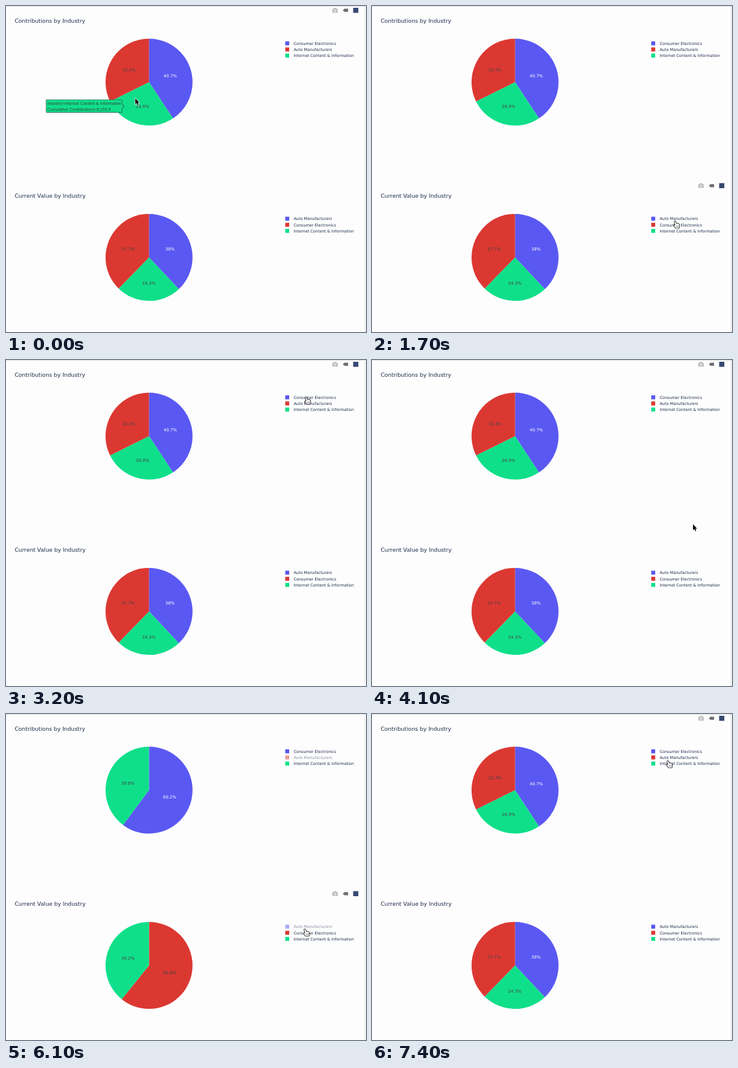
Write an HTML page with a canvas that moves like this. It is 600 px wide and 544 px high and loops after 7500 ms.

```html
<!DOCTYPE html>
<html lang="en">
<head>
<meta charset="utf-8">
<title>Industry pies</title>
<style>
html, body { margin: 0; width: 100%; height: 100%; overflow: hidden; background: #fdfdfe; }
canvas { display: block; }
</style>
</head>
<body>
<canvas id="stage" width="600" height="544"></canvas>
<script>
const ctx = document.getElementById('stage').getContext('2d');
const LOOP = 7500, STEP = 100, CX = 238.4, R = 72.5, TAU = Math.PI * 2;
const BLUE = '#5a58f2', RED = '#dc3832', GREEN = '#10df8a';
const SANS = '"DejaVu Sans", Verdana, sans-serif';
const ARIAL = '"Liberation Sans", Arial, sans-serif';

const slice = (name, value, color) => ({ name, value, color });
// `off` is the time span in which the Auto Manufacturers slice is switched off
const plots = [
  { top: 0, title: 'Contributions by Industry', field: 'Cumulative Contributions', off: [4400, 6700],
    data: [slice('Consumer Electronics', 13842.6, BLUE),
           slice('Auto Manufacturers', 10990.4, RED),
           slice('Internet Content & Information', 9153.9, GREEN)] },
  { top: 292.6, title: 'Current Value by Industry', field: 'Daily Balance', off: [5300, 6300],
    data: [slice('Auto Manufacturers', 22812.3, BLUE),
           slice('Consumer Electronics', 22619.7, RED),
           slice('Internet Content & Information', 14584.2, GREEN)] }
];

// Pointer path: time, x, y
const path = [
  [0, 215.5, 154], [100, 214, 160], [500, 222, 330], [700, 219, 458], [800, 219, 458],
  [1000, 200, 410], [1200, 272, 400], [1600, 505, 359], [2500, 505, 359],
  [2900, 502, 160], [3200, 500, 62], [3400, 510, 66], [4000, 537, 266], [4100, 535, 274],
  [4300, 498, 73], [4400, 498, 73], [4600, 570, 300], [4700, 570, 300], [5100, 498, 359],
  [6200, 498, 359], [6600, 499, 72], [6800, 499, 72], [7400, 493, 78]
];

function pointerAt(t) {
  const i = path.findIndex(p => p[0] > t);
  if (i < 0) return path[path.length - 1].slice(1);
  const [t0, x0, y0] = path[i - 1], [t1, x1, y1] = path[i];
  const k = (t - t0) / (t1 - t0);
  return [x0 + (x1 - x0) * k, y0 + (y1 - y0) * k];
}

function text(str, x, y, size, color, align = 'left', family = SANS) {
  ctx.font = `${size}px ${family}`;
  ctx.fillStyle = color;
  ctx.textAlign = align;
  ctx.fillText(str, x, y);
}

function rect(x, y, w, h, color) {
  ctx.fillStyle = color;
  ctx.fillRect(x, y, w, h);
}

function shape(d, x, y, fill, stroke, width = 1) {
  const p = new Path2D(d);
  ctx.save();
  ctx.translate(x, y);
  ctx.lineJoin = 'round';
  ctx.lineWidth = width;
  if (stroke) { ctx.strokeStyle = stroke; ctx.stroke(p); }
  ctx.fillStyle = fill;
  ctx.fill(p, 'evenodd');
  ctx.restore();
}

// The first slice runs clockwise from the top, the others counterclockwise.
function layout(plot, t) {
  const shown = plot.data.filter(s => !isOff(plot, s, t));
  const total = shown.reduce((sum, s) => sum + s.value, 0);
  let a = 0;
  return [shown[0], ...shown.slice(1).reverse()].map(s => {
    const part = s.value / total, start = a;
    a += part * TAU;
    const mid = (start + a) / 2;
    const inner = R / (1 + 1 / Math.sin(Math.PI * Math.min(part, 0.5)));
    return { ...s, part, start, end: a, mid, inner,
      x: CX + Math.sin(mid) * (R - inner),
      y: plot.top + 127 - Math.cos(mid) * (R - inner) };
  });
}

function isOff(plot, s, t) {
  return s.name.startsWith('Auto') && t >= plot.off[0] && t < plot.off[1];
}

function drawPlot(plot, slices, t) {
  const cy = plot.top + 127;
  text(plot.title, 14.4, plot.top + 27.5, 9.25, '#1b2947');
  for (const s of slices) {
    ctx.beginPath();
    ctx.moveTo(CX, cy);
    ctx.arc(CX, cy, R, s.start - TAU / 4, s.end - TAU / 4);
    ctx.fillStyle = s.color;
    ctx.fill();
  }
  for (const s of slices) {
    const label = parseFloat((s.part * 100).toPrecision(3)) + '%';
    text(label, s.x, s.y + 2.5, 7, s.color === BLUE ? '#fff' : '#444', 'center');
  }
  plot.data.forEach((s, i) => {
    const y = plot.top + 62.3 + i * 10.2;
    ctx.globalAlpha = isOff(plot, s, t) ? 0.5 : 1;
    rect(465.4, y - 3.3, 6.6, 6.6, s.color);
    text(s.name, 479.4, y + 2.4, 6.5, '#1b2947');
    ctx.globalAlpha = 1;
  });
}

function drawTip(plot, s) {
  const lines = ['Industry=' + s.name,
    `${plot.field}=${s.value.toLocaleString('en-US', { minimumFractionDigits: 1 })}`];
  ctx.font = `7px ${ARIAL}`;
  const w = Math.max(...lines.map(l => ctx.measureText(l).width)) + 3;
  const side = Math.sin(s.mid) < 0 ? -1 : 1;
  const x = s.x + side * s.inner, near = x + side * 3.5, far = near + side * w;
  const ink = s.color === BLUE ? '#fff' : '#33443c';
  shape(`M0 0L${near - x} -3.5V-10.2H${far - x}V10.2H${near - x}V3.5Z`, x, s.y, s.color, ink, 1.4);
  lines.forEach((l, i) => text(l, Math.min(near, far) + 1.7, s.y - 2 + i * 9.5, 7, ink, 'left', ARIAL));
}

function drawToolbar(y) {
  shape('M-4.3 -2.5H-2.3L-1.5 -4H1.5L2.3 -2.5H4.3V3.7H-4.3Z M2.2 .5A2.2 2.2 0 1 0 -2.2 .5A2.2 2.2 0 1 0 2.2 .5Z' +
    'M1.2 .5A1.2 1.2 0 1 1 -1.2 .5A1.2 1.2 0 1 1 1.2 .5Z', 548.4, y, '#b4b4b6');
  shape('M-4.6 0L-2 -2.6H4.2V2.6H-2Z', 566, y, '#707074');
  rect(578.6, y - 4.2, 8.6, 8.4, '#364a72');
}

function drawPointer(x, y, hand) {
  if (hand) {
    shape('M-1 .8Q0 -.6 1 .8L2 4.2L3 3.7L4.1 4.3L5.2 4L6 4.8L6.8 5L7.3 8L6.6 11.5H1.3L-1.6 7.6Q-2 6.3 -.8 6.5L.6 7.3Z',
      x, y, '#fff', '#111', 1.7);
    shape('M2.2 7.2H2.7V10H2.2ZM3.8 7.2H4.3V10H3.8ZM5.3 7.2H5.8V10H5.3Z', x, y, '#333');
  } else {
    shape('M0 0V10L2.2 8L3.8 11.5L5.4 10.8L3.9 7.4H6.8Z', x, y, '#000', '#fff', 1.5);
  }
}

function draw(t) {
  const [x, y] = pointerAt(t);
  rect(0, 0, 600, 544, '#fdfdfe');
  rect(0, 0, 600, 1, '#dedee0');
  rect(598, 0, 1, 544, '#e2e2e4');
  const active = plots[y < 292 ? 0 : 1];
  let hovered;
  for (const plot of plots) {
    const slices = layout(plot, t);
    drawPlot(plot, slices, t);
    const dx = x - CX, dy = y - plot.top - 127;
    if (Math.hypot(dx, dy) < R) {
      const a = (Math.atan2(dx, -dy) + TAU) % TAU;
      hovered = slices.find(s => a >= s.start && a < s.end);
    }
  }
  drawToolbar(active.top + 7.2);
  if (hovered) drawTip(active, hovered);
  const row = y - active.top;
  drawPointer(x, y, x > 463 && x < 585 && row > 56 && row < 89);
}

function frame() {
  draw(Math.floor(performance.now() % LOOP / STEP) * STEP);
  requestAnimationFrame(frame);
}
frame();
</script>
</body>
</html>
```
